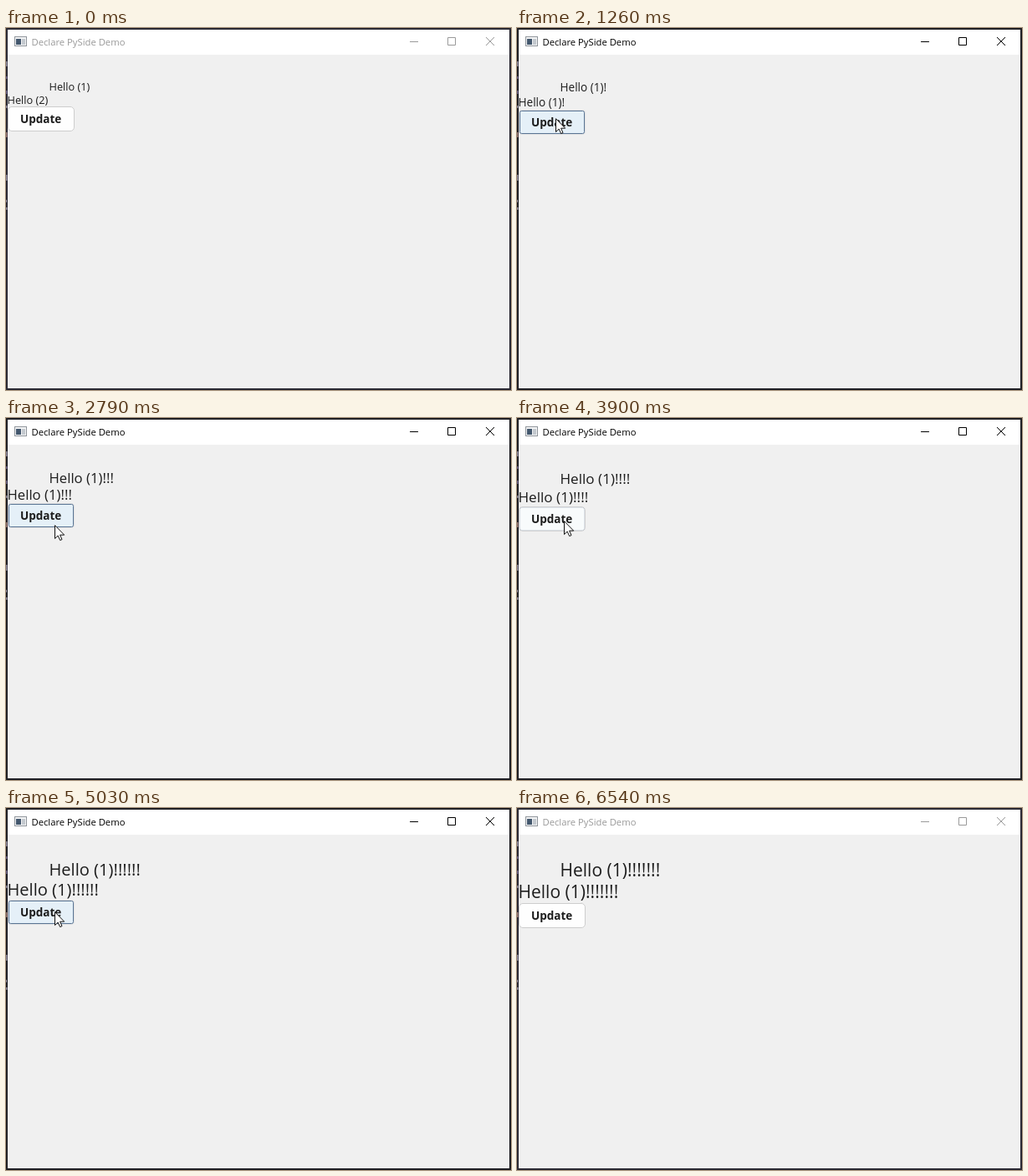
These frames come from a looping animation (604 by 434 pixels, 6620 ms). An HTML page:

```html
<!DOCTYPE html>
<html lang="en">
<head>
<meta charset="utf-8">
<title>Declare PySide Demo</title>
<style>
html, body { margin: 0; width: 100%; height: 100%; overflow: hidden; background: #25242c; }
svg { display: block; width: 604px; height: 434px; font-family: "Open Sans", "Noto Sans", sans-serif; }

svg * { animation: 6620ms linear infinite; }
.step, .step * { animation-timing-function: step-end; }

/* window focus */
#frame { animation-name: frame; fill: #25242c; }
#caption { animation-name: focus; color: #999; }
@keyframes frame { 0% { fill: #2a2933; } 15.11% { fill: #1f1f24; } 98.79%, 100% { fill: #2a2933; } }
@keyframes focus { 0% { color: #999; } 15.11% { color: #000; } 98.79%, 100% { color: #999; } }

/* labels grow with every click */
.label { fill: #1d1d1d; font-size: 12.75px; }
#first { animation-name: size, first; }
#second { animation-name: size, second, e1; }
#before { animation-name: before; }
@keyframes size {
  0% { font-size: 12.75px; } 16.62% { font-size: 13.6px; } 25.08% { font-size: 15.3px; }
  37.46% { font-size: 16.7px; } 50.76% { font-size: 17.1px; } 61.63% { font-size: 18.6px; }
  72.21% { font-size: 20.1px; } 82.33%, 100% { font-size: 21px; }
}
@keyframes first {
  0% { transform: translateY(0); } 16.62% { transform: translateY(1px); } 25.08% { transform: translateY(2px); }
  37.46% { transform: translateY(3px); } 50.76% { transform: translateY(4px); } 61.63% { transform: translateY(5px); }
  72.21% { transform: translateY(6px); } 82.33%, 100% { transform: translateY(7px); }
}
@keyframes second {
  0% { transform: translateY(0); } 16.62% { transform: translateY(3px); } 25.08% { transform: translateY(5px); }
  37.46% { transform: translateY(7px); } 50.76% { transform: translateY(10px); } 61.63% { transform: translateY(12px); }
  72.21% { transform: translateY(14px); } 82.33%, 100% { transform: translateY(17px); }
}
@keyframes before { 0% { fill-opacity: 1; } 16.62%, 100% { fill-opacity: 0; } }

/* one exclamation mark per click */
.e1 { animation-name: e1; } .e2 { animation-name: e2; } .e3 { animation-name: e3; } .e4 { animation-name: e4; }
.e5 { animation-name: e5; } .e6 { animation-name: e6; } .e7 { animation-name: e7; }
@keyframes e1 { 0% { fill-opacity: 0; } 16.62%, 100% { fill-opacity: 1; } }
@keyframes e2 { 0% { fill-opacity: 0; } 25.08%, 100% { fill-opacity: 1; } }
@keyframes e3 { 0% { fill-opacity: 0; } 37.46%, 100% { fill-opacity: 1; } }
@keyframes e4 { 0% { fill-opacity: 0; } 50.76%, 100% { fill-opacity: 1; } }
@keyframes e5 { 0% { fill-opacity: 0; } 61.63%, 100% { fill-opacity: 1; } }
@keyframes e6 { 0% { fill-opacity: 0; } 72.21%, 100% { fill-opacity: 1; } }
@keyframes e7 { 0% { fill-opacity: 0; } 82.33%, 100% { fill-opacity: 1; } }

/* button */
#button { animation-name: drop; animation-timing-function: step-end; }
@keyframes drop {
  0% { transform: translateY(0); } 16.62% { transform: translateY(4px); } 25.08% { transform: translateY(6px); }
  37.46% { transform: translateY(8px); } 50.76% { transform: translateY(12px); } 61.63% { transform: translateY(14px); }
  72.21% { transform: translateY(16px); } 82.33%, 100% { transform: translateY(20px); }
}
#hover { animation-name: hover; }
@keyframes hover {
  0%, 6.95% { opacity: 0; } 11.33%, 52.3% { opacity: 1; } 57.1%, 58.1% { opacity: 0; }
  58.91% { opacity: .2; } 62.7%, 87.3% { opacity: 1; } 93.66%, 100% { opacity: 0; }
}
#press { animation-name: press; }
@keyframes press {
  0%, 14.8% { opacity: 0; } 16%, 16.62% { opacity: .9; } 18.5%, 23.27% { opacity: 0; }
  24.5%, 25.08% { opacity: .9; } 27%, 35.65% { opacity: 0; } 36.9%, 37.46% { opacity: .9; }
  39.4%, 48.95% { opacity: 0; } 50.2%, 50.76% { opacity: .9; } 52.7%, 59.8% { opacity: 0; }
  61%, 61.63% { opacity: .9; } 63.6%, 70.4% { opacity: 0; } 71.6%, 72.21% { opacity: .9; }
  74.2%, 80.5% { opacity: 0; } 81.7%, 82.33% { opacity: .9; } 84.3%, 100% { opacity: 0; }
}

/* pointer */
#pointer { animation-name: pointer; }
@keyframes pointer {
  0%, 1.8% { transform: translate(304px, 440px); }
  1.81% { transform: translate(304px, 418px); animation-timing-function: ease-out; }
  7.25%, 15.11% { transform: translate(48px, 110px); }
  19.03%, 22.66% { transform: translate(46px, 108px); }
  25.08% { transform: translate(50px, 109px); }
  27.95%, 28.7% { transform: translate(56px, 112px); }
  32.33%, 35.35% { transform: translate(57px, 125px); }
  37.46% { transform: translate(57px, 120px); }
  42.15%, 44.56% { transform: translate(58px, 128px); }
  46.53%, 50.76% { transform: translate(54px, 113px); }
  54.38%, 56.5% { transform: translate(58px, 144px); }
  58.91%, 59.37% { transform: translate(56px, 123px); }
  61.63% { transform: translate(56px, 121px); }
  66.62%, 69.94% { transform: translate(58px, 135px); }
  72.21% { transform: translate(57px, 123px); }
  75.98%, 82.33% { transform: translate(58px, 124px); }
  86.71% { transform: translate(60px, 129px); animation-timing-function: ease-in; }
  90.18%, 90.63% { transform: translate(257px, 297px); }
  93.35% { transform: translate(338px, 426px); }
  93.81%, 100% { transform: translate(346px, 440px); }
}
</style>
</head>
<body>
<svg viewBox="0 0 604 434">
  <g class="step">
    <rect id="frame" width="604" height="434"/>
    <g fill="#a9a3b8" opacity=".8">
      <rect y="40" width="1.5" height="6"/>
      <rect y="58" width="1.5" height="3" fill="#7d6f9c"/>
      <rect y="75" width="1.5" height="4" fill="#7d6f9c"/>
      <rect y="93" width="1.5" height="3"/>
      <rect y="125" width="1.5" height="6" fill="#b58b84"/>
      <rect y="176" width="1.5" height="7"/>
      <rect y="206" width="1" height="3"/>
      <rect y="215" width="1.5" height="3"/>
    </g>
    <rect x="2" y="2" width="600" height="30" fill="#fff"/>
    <rect x="2" y="32" width="600" height="400" fill="#f0f0f0"/>

    <rect x="10.5" y="10.5" width="14" height="11" fill="#f3f4f5" stroke="#90959b"/>
    <rect x="12" y="13" width="6" height="7" fill="#44586e"/>
    <rect x="19" y="13" width="4" height="7" fill="#c3c8ce"/>

    <g id="caption" fill="none" stroke="currentColor">
      <text x="30.5" y="21" font-size="11.25" fill="currentColor" stroke="none">Declare PySide Demo</text>
      <path d="M483 16.5h10M528.5 11.5h9v9h-9z"/>
      <path d="M574 11l10 10M584 11l-10 10"/>
    </g>

    <text id="first" class="label" x="51.5" y="75">Hello (1)<tspan class="e1">!</tspan><tspan class="e2">!</tspan><tspan class="e3">!</tspan><tspan class="e4">!</tspan><tspan class="e5">!</tspan><tspan class="e6">!</tspan><tspan class="e7">!</tspan></text>
    <text id="before" class="label" x="1.5" y="91">Hello (2)</text>
    <text id="second" class="label" x="1.5" y="91">Hello (1)<tspan class="e1">!</tspan><tspan class="e2">!</tspan><tspan class="e3">!</tspan><tspan class="e4">!</tspan><tspan class="e5">!</tspan><tspan class="e6">!</tspan><tspan class="e7">!</tspan></text>
  </g>

  <g id="button">
    <rect x="2.5" y="94.5" width="79" height="29" rx="4.5" fill="#fefefe" stroke="#cdcdcd"/>
    <g id="hover">
      <rect x="2.5" y="94.5" width="79" height="29" rx="3.5" fill="none" stroke="#dedfe1"/>
      <rect x="3.5" y="95.5" width="77" height="27" rx="2" fill="#e5f0f8" stroke="#5a7594"/>
    </g>
    <rect id="press" x="3.5" y="95.5" width="77" height="27" rx="2" fill="#cfe4f5" stroke="#3f6288"/>
    <text x="17" y="114" font-size="13.5" font-weight="700" fill="#1d1d1d">Update</text>
  </g>

  <path id="pointer" d="M.5 .7V16.6L4.2 13.1L6.7 18.6L9 17.6L6.6 12.2H11.7Z" fill="#fff" stroke="#111"/>
</svg>
</body>
</html>
```
